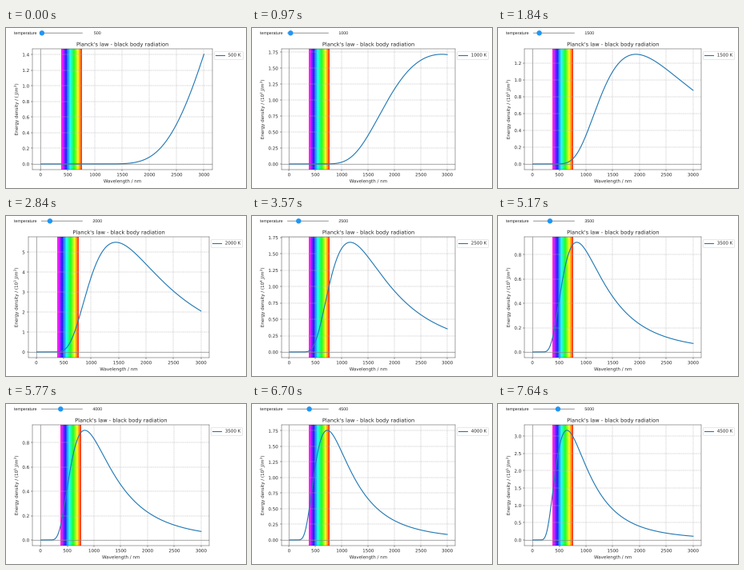
A matplotlib script for the animation above (8 s loop, 300 by 200 pixels).

```python
import numpy as np
import matplotlib.pyplot as plt
from matplotlib.animation import FuncAnimation
from matplotlib.patches import Circle
from matplotlib.patheffects import Normal

W, H, DPI = 300, 200, 40
LOOP, STEP = 8000, 40
PX = 72 / DPI  # points per pixel
INK, FRAME = "#262626", "#333333"

plt.rcParams.update({
    "font.family": "DejaVu Sans",
    "text.hinting": "none",
    "text.hinting_factor": 8,
    "path.effects": [Normal()],  # text as outlines, for subpixel placement
    "text.color": INK,
    "axes.labelcolor": INK,
    "axes.edgecolor": FRAME,
    "xtick.color": FRAME,
    "ytick.color": FRAME,
    "xtick.labelcolor": INK,
    "ytick.labelcolor": INK,
})

# Moments when the slider jumps by 500 K, and when the plot follows
SLIDER_TIMES = [500, 1500, 2440, 3240, 3970, 4840, 5770, 6700, 7640]
PLOT_TIMES = [970, 1840, 2840, 3570, 4370, 5170, 6100, 7100]

PLANCK, LIGHT, BOLTZMANN = 6.62607e-34, 2.997925e8, 1.380649e-23
wave = np.linspace(10, 3000, 600)


def planck(temp):
    """Spectral energy density for wavelengths in nm."""
    lam = wave * 1e-9
    x = np.minimum(PLANCK * LIGHT / (lam * BOLTZMANN * temp), 600)
    return 8 * np.pi * PLANCK * LIGHT / lam**5 / np.expm1(x)


def exponent(peak):
    return int(np.floor(np.log10(peak) + 0.1))


fig = plt.figure(figsize=(W / DPI, H / DPI), dpi=DPI, facecolor="white")

# Slider row, in pixel coordinates
ui = fig.add_axes([0, 0, 1, 1])
ui.set(xlim=(0, W), ylim=(H, 0))
ui.axis("off")
ui_font = dict(family="Liberation Sans", size=5.3 * PX, va="baseline")
ui.text(38.3, 8, "temperature", ha="right", **ui_font)
readout = ui.text(114.2, 8, "", ha="center", **ui_font)
ui.plot([44.6, 95.2], [6.3, 6.3], color="#9e9e9e", lw=1.1 * PX, snap=False)
knob = Circle((44.9, 6.3), 3.2, fc="#2196f3", ec="none", zorder=3)
ui.add_patch(knob)

# Plot
ax = fig.add_axes([0.1, 0.1, 0.8, 0.8])
ax.imshow(np.linspace(1, 0.03, 256)[None, :], cmap="gist_rainbow",
          vmin=0, vmax=1, alpha=0.88, extent=(380, 760, 0, 1),
          transform=ax.get_xaxis_transform(), aspect="auto",
          interpolation="bilinear", zorder=0.5)
ax.grid(linestyle="--")
ax.axhline(0, color="grey", lw=1)
ax.axvline(0, color="grey", lw=1)
curve, = ax.plot([], [], color="#1f77b4", lw=2, label="500 K", zorder=3)
ax.set_title("Planck's law - black body radiation")
ax.set_xlabel("Wavelength / nm")
ax.set_xlim(-150, 3150)
legend = ax.legend(loc="upper left", bbox_to_anchor=(0.997, 1))

TOP, BOTTOM = 26, 176.8
LEFT_BY_CHARS = {1: 27.6, 3: 33.0, 4: 36.5}


def show_slider(level):
    knob.center = (44.9 + 3.34 * level, 6.3)
    readout.set_text(str(500 * (level + 1)))


def show_plot(level):
    temp = 500 * (level + 1)
    energy = planck(temp)
    power = exponent(energy.max())
    energy = energy / 10.0**power
    peak = energy.max()
    curve.set_data(wave, energy)
    ax.set_ylim(-0.05 * peak, 1.05 * peak)

    # Fit the axes between the tick labels and the legend
    ticks = ax.yaxis.get_major_locator()()
    labels = ax.yaxis.get_major_formatter().format_ticks(ticks)
    left = LEFT_BY_CHARS[len(labels[len(labels) // 2])]
    right = 257.6 if temp < 1000 else 253.9
    ax.set_position([left / W, 1 - BOTTOM / H,
                     (right - left) / W, (BOTTOM - TOP) / H])

    scale = f"$10^{power}$" if power else ""
    ax.set_ylabel(f"Energy density / ({scale} $J/m^3$)")
    legend.get_texts()[0].set_text(f"{temp} K")


def level_at(times, t):
    return sum(t >= start for start in times)


def update(i):
    t = i * STEP + STEP / 2
    show_slider(level_at(SLIDER_TIMES, t))
    show_plot(level_at(PLOT_TIMES, t))
    return []


anim = FuncAnimation(fig, update, frames=LOOP // STEP, interval=STEP,
                     init_func=lambda: update(0), repeat=True, repeat_delay=0,
                     blit=False, cache_frame_data=False)
plt.show()
```
